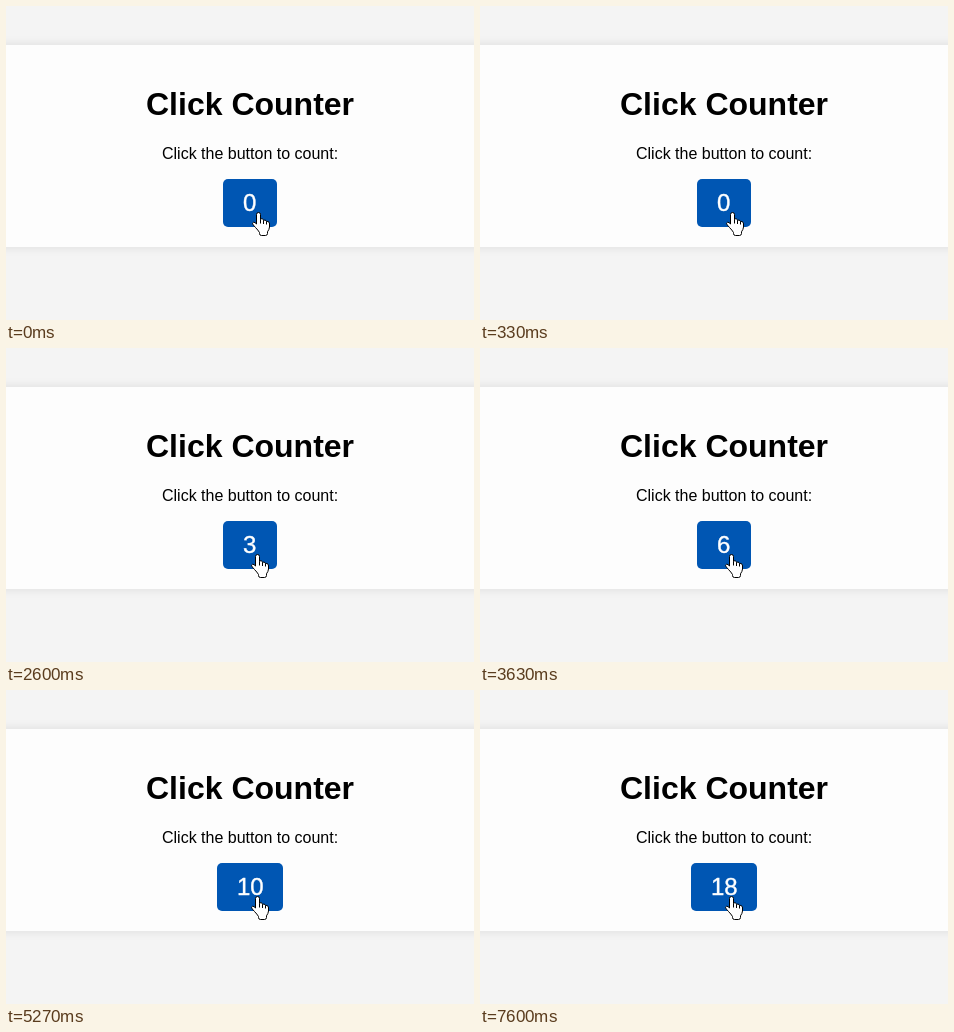
These frames come from a looping animation (468 by 314 pixels, 8 s). An HTML page with a canvas:

```html
<!DOCTYPE html>
<html lang="en">
<head>
<meta charset="utf-8">
<title>Click Counter</title>
<style>
  html, body { margin: 0; width: 468px; height: 314px; overflow: hidden; background: #f4f4f4; }
  canvas { display: block; }
</style>
</head>
<body>
<canvas id="stage" width="468" height="314"></canvas>
<script>
const ctx = document.getElementById('stage').getContext('2d');
const LOOP = 8000;
const CENTER = 244;
const FAMILY = '"Liberation Sans", Arial, sans-serif';

// The counter goes up by one at each of these times (ms).
const clicks = [770, 1600, 2600, 3000, 3330, 3630, 4070, 4370, 4870,
  5270, 5330, 5770, 6000, 6270, 6700, 6730, 7300, 7570];
const cursorShift = 570;

const hand = new Path2D(`M6.5 .5 Q8.5 .5 8.5 2.5 V7.5 Q9 6.6 10.3 6.8 Q11.5 7.2 11.5 8.5
  Q13 7.6 14.1 8.6 L14.5 9.6 Q16 9 17 10.2 Q17.5 10.9 17.5 12 V15
  Q17.3 17.5 15.5 19.8 V21.5 Q15.4 23.5 13.5 23.5 H9.5 Q7.5 23.5 7.5 21.5 V20.5
  Q6 18 3.5 15.5 Q.5 12.5 .5 11.3 Q1.4 9.6 3 10.6 L4.5 12 V2.5 Q4.5 .5 6.5 .5 Z`);
const fingers = new Path2D('M8.5 7.5 V11.5 M11.5 8.5 V12 M14.5 9.5 V12.5');

function setFont(font) {
  ctx.font = `${font} ${FAMILY}`;
}

// Centred text that starts on a whole pixel.
function text(str, y, font, color) {
  setFont(font);
  ctx.fillStyle = color;
  const x = Math.round(CENTER - ctx.measureText(str).width / 2);
  ctx.fillText(str, x, y);
  return x;
}

function drawPanel() {
  ctx.save();
  ctx.shadowColor = 'rgba(0, 0, 0, .1)';
  ctx.shadowBlur = 10;
  ctx.fillStyle = '#fdfdfd';
  ctx.fillRect(-20, 39, 508, 202);
  ctx.restore();
}

function drawButton(count) {
  const label = String(count);
  setFont('24px');
  const half = ctx.measureText(label).width / 2 + 20;
  const left = Math.round(CENTER - half);
  const right = Math.round(CENTER + half);
  ctx.fillStyle = '#0056b3';
  ctx.beginPath();
  ctx.roundRect(left, 173, right - left, 48, 5);
  ctx.fill();
  const x = text(label, 205, '24px', '#fff');
  ctx.strokeStyle = '#fff';
  ctx.lineWidth = 0.4;
  ctx.strokeText(label, x, 205);
}

function drawCursor(x, y) {
  ctx.save();
  ctx.translate(x, y);
  ctx.fillStyle = '#fff';
  ctx.strokeStyle = '#000';
  ctx.lineWidth = 1;
  ctx.fill(hand);
  ctx.stroke(hand);
  ctx.stroke(fingers);
  ctx.restore();
}

function draw(t) {
  ctx.fillStyle = '#f4f4f4';
  ctx.fillRect(0, 0, 468, 314);
  drawPanel();
  text('Click Counter', 109, 'bold 32px', '#000');
  text('Click the button to count:', 153, '16px', '#000');
  drawButton(clicks.filter(c => c <= t).length);
  drawCursor(t < cursorShift ? 246 : 245, 206);
}

const start = performance.now();
function tick() {
  draw((performance.now() - start) % LOOP);
  requestAnimationFrame(tick);
}
tick();
</script>
</body>
</html>
```
